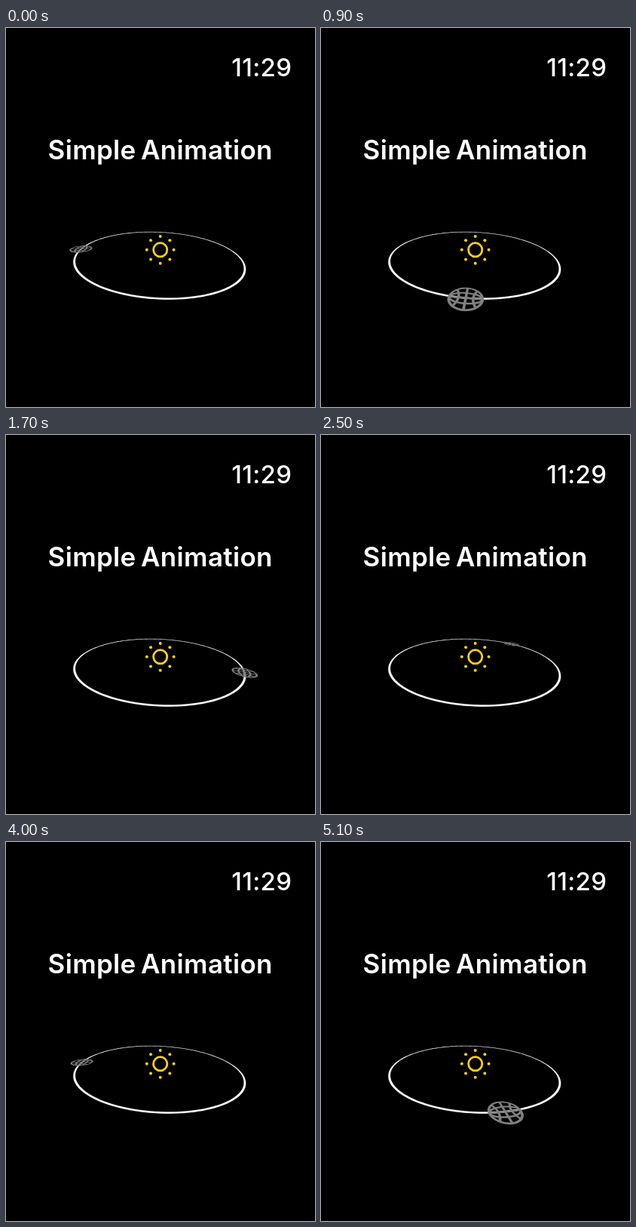
An HTML page that plays this animation: 410x502 px, repeating every 5200 ms.

```html
<!DOCTYPE html>
<html lang="en">
<head>
<meta charset="utf-8">
<title>Simple Animation</title>
<style>
  html, body { margin: 0; width: 100%; height: 100%; overflow: hidden; background: #000; }
  svg { display: block; width: 100vw; height: 100vh; }
  text { fill: #fff; font-family: Inter, Roboto, sans-serif; letter-spacing: 0.32px; }
  .title { font-size: 35px; font-weight: 600; word-spacing: -2.7px; text-anchor: middle; }
  .clock { font-size: 33px; font-weight: 500; text-anchor: end; }
</style>
</head>
<body>
<svg id="stage" viewBox="0 0 410 502">
  <rect width="410" height="502" fill="#000"/>
  <text class="clock" x="379.3" y="64">11:29</text>
  <text class="title" x="204.7" y="174">Simple Animation</text>
  <path id="orbit" fill="#fff" stroke="#fff" stroke-width="0.25"/>
  <g id="sun" fill="#ffd014" transform="translate(204.7 293.8)">
    <circle r="9.1" fill="none" stroke="#ffd014" stroke-width="2.8"/>
  </g>
  <g id="globe" fill="#808080"></g>
</svg>
<script>
const NS = 'http://www.w3.org/2000/svg';
const LOOP = 5200, STEP = 100;          // ms
const RADIUS = 100, GLOBE = 11.9, LINE = 1.85;
const CENTER = { x: 204.8, y: 293.8 };
const PITCH = 70 * Math.PI / 180;       // how far the plane leans back
const AXIS = Math.atan(0.05);           // slant of the leaning axis
const START = 176.4, SPEED = 89.6;      // degrees, degrees per second

const $ = id => document.getElementById(id);

function add(parent, tag, attrs = {}) {
  const el = document.createElementNS(NS, tag);
  for (const key in attrs) el.setAttribute(key, attrs[key]);
  return parent.appendChild(el);
}

function turn([x, y], a) {
  const c = Math.cos(a), s = Math.sin(a);
  return [x * c - y * s, x * s + y * c];
}

// Lean a point of the orbit plane back and view it in perspective.
function project(p) {
  const [u, v] = turn(p, -AXIS);
  const w = 1 - Math.sin(PITCH) * v / (2 * RADIUS);
  const [x, y] = turn([u / w, v * Math.cos(PITCH) / w], AXIS);
  return [CENTER.x + x, CENTER.y + y];
}

// Outline of a line of even width along a curve, s from 0 to 1.
function band(curve, width, n) {
  const left = [], right = [], e = 1e-4;
  for (let i = 0; i <= n; i++) {
    const s = i / n, [x, y] = curve(s);
    const [x0, y0] = curve(s - e), [x1, y1] = curve(s + e);
    const k = width / 2 / Math.hypot(x1 - x0, y1 - y0);
    const nx = (y0 - y1) * k, ny = (x1 - x0) * k;
    left.push([x + nx, y + ny]);
    right.unshift([x - nx, y - ny]);
  }
  return left.concat(right);
}

const toPath = pts =>
  'M' + pts.map(p => project(p).map(n => n.toFixed(2)).join(' ')).join('L') + 'Z';

const ellipse = (rx, ry) => s =>
  [rx * Math.cos(2 * Math.PI * s), ry * Math.sin(2 * Math.PI * s)];

const latitude = side => s => {
  const x = 2 * s - 1;
  return [x * GLOBE * 0.76, side * GLOBE * (0.44 + 0.2 * x * x)];
};

$('orbit').setAttribute('d', toPath(band(ellipse(RADIUS, RADIUS), 1.8, 180)));

for (let i = 0; i < 8; i++) {
  const [cx, cy] = turn([17.9, 0], i * Math.PI / 4);
  add($('sun'), 'circle', { cx, cy, r: 2 });
}

const parts = [
  ellipse(GLOBE, GLOBE),
  ellipse(GLOBE * 0.48, GLOBE),
  s => [0, (2 * s - 1) * GLOBE],
  s => [(2 * s - 1) * GLOBE, 0],
  latitude(-1),
  latitude(1)
].map(curve => ({ shape: band(curve, LINE, 40), el: add($('globe'), 'path') }));

function draw(ms) {
  const t = Math.floor(ms % LOOP / STEP) * STEP / 1000;
  const angle = (START - SPEED * t) * Math.PI / 180;
  for (const { shape, el } of parts) {
    el.setAttribute('d', toPath(shape.map(([x, y]) => turn([x + RADIUS, y], angle))));
  }
}

let begin;
function tick(now) {
  if (begin === undefined) begin = now;
  draw(now - begin);
  requestAnimationFrame(tick);
}
draw(0);
requestAnimationFrame(tick);
</script>
</body>
</html>
```
